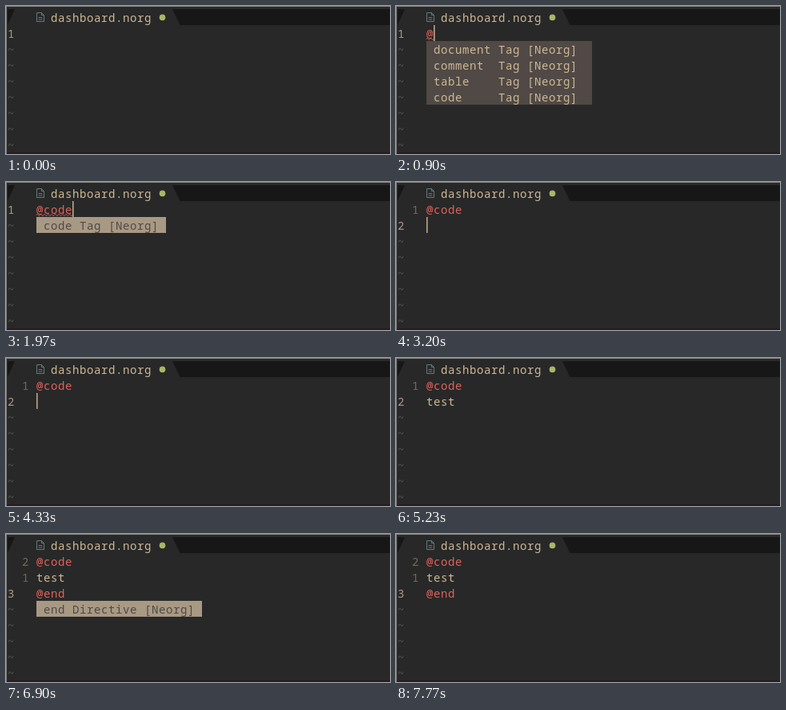
These frames come from a looping animation (480 px wide and 186 px high, 8000 ms). An HTML page:

```html
<!DOCTYPE html>
<html lang="en">
<head>
<meta charset="utf-8">
<title>Editor completion</title>
<style>
  html, body { margin: 0; width: 100%; height: 100%; overflow: hidden; background: #282828; }
  svg { display: block; width: 480px; height: 186px; }
  text {
    font-family: "Source Code Pro", "Noto Sans Mono", "DejaVu Sans Mono", monospace;
    font-size: 14px;
    letter-spacing: .6px;
    fill: #ceb995;
    white-space: pre;
  }
  .tag { fill: #de635b; }
  .now { fill: #a89984; }
  .rel { fill: #74695e; }
  .tilde { fill: #5a524c; }
  .menu rect { fill: #504945; }
  .menu.sel rect { fill: #a89984; }
  .menu.sel text { fill: #504945; }
</style>
</head>
<body>
<svg viewBox="0 0 480 186">
  <rect width="480" height="186" fill="#282828"/>
  <path d="M2 4H11L2 24ZM208 4H480V24H217.5Z" fill="#171717"/>
  <path d="M0 .5H480M.5 0V186" stroke="#80807d"/>
  <rect x="1" y="184" width="479" height="2" fill="#261c1f"/>
  <path d="M38.5 8.5H44.5L47.5 11.5V19.5H38.5ZM44.5 8.5V11.5H47.5M40.5 14.5H45.5M40.5 17H45.5"
    fill="none" stroke="#627a7d"/>
  <text x="56" y="19.5">dashboard.norg</text>
  <circle cx="195.5" cy="14.4" r="3.8" fill="#a9b665"/>
  <g id="view"></g>
</svg>
<script>
const LOOP = 8000, CELL = 9, ROW = 20, LEFT = 38, TOP = 24, ROWS = 8;
const view = document.getElementById("view");

const menus = {
  all: { width: 23, rows: ["document Tag [Neorg]", "comment  Tag [Neorg]", "table    Tag [Neorg]", "code     Tag [Neorg]"] },
  co: { width: 21, rows: ["comment Tag [Neorg]", "code    Tag [Neorg]"] },
  code: { width: 18, rows: ["code Tag [Neorg]"] },
  end: { width: 23, rows: ["end Directive [Neorg]"] }
};

// Each step changes part of the editor state.
const steps = [
  [0, { text: "", cursor: false, menu: "", sel: false, wave: false }],
  [200, { cursor: true }],
  [270, { text: "@", wave: true }],
  [570, { menu: "all" }],
  [1200, { text: "@c" }],
  [1230, { menu: "co" }],
  [1300, { text: "@co" }],
  [1430, { text: "@cod", menu: "code" }],
  [1600, { text: "@code" }],
  [2630, { cursor: false }],
  [2800, { cursor: true, menu: "" }],
  [2970, { wave: false }],
  [3200, { text: "@code\n" }],
  [3800, { cursor: false }],
  [4300, { cursor: true }],
  [4370, { text: "@code\nt" }],
  [4450, { text: "@code\nte" }],
  [4530, { text: "@code\ntes" }],
  [4600, { text: "@code\ntest" }],
  [5230, { cursor: false }],
  [5370, { text: "@code\ntest\n", cursor: true }],
  [5600, { text: "@code\ntest\n@" }],
  [5630, { text: "@code\ntest\n@e", menu: "end" }],
  [6270, { text: "@code\ntest\n@en" }],
  [6360, { text: "@code\ntest\n@end" }],
  [6530, { sel: true }],
  [6830, { cursor: false }],
  [7230, { cursor: true, menu: "", sel: false }],
  [7770, { cursor: false }]
];

function stateAt(t) {
  const state = {};
  for (const [start, change] of steps) if (t >= start) Object.assign(state, change);
  // The held key flips the selection until it rests on the entry.
  if (t >= 1770 && t < 2800) state.sel = Math.floor((Math.min(t, 2570) - 1770) / 50) % 2 === 0;
  return state;
}

const label = (x, row, text, kind = "") =>
  `<text x="${x}" y="${TOP + row * ROW + 15.5}" class="${kind}">${text}</text>`;

function wave(cells) {
  let d = `M${LEFT} 41.5`;
  for (let i = 0; i < cells * 2; i++) d += "q1.125 -2.4 2.25 0t2.25 0";
  return `<path d="${d}" fill="none" stroke="#de635b"/>`;
}

function menu(name, row, sel) {
  const { width, rows } = menus[name];
  const box = `<rect x="${LEFT}" y="${TOP + row * ROW}" width="${width * CELL}" height="${rows.length * ROW}"/>`;
  return `<g class="menu${sel ? " sel" : ""}">${box}` +
    rows.map((text, i) => label(LEFT + CELL, row + i, text)).join("") + "</g>";
}

function render(state) {
  const lines = state.text.split("\n"), last = lines.length - 1;
  let out = "";
  for (let i = 0; i < ROWS; i++) {
    if (i > last) { out += label(2, i, "~", "tilde"); continue; }
    out += i === last ? label(2, i, i + 1, "now") : label(20, i, last - i, "rel");
    out += label(LEFT, i, lines[i], lines[i][0] === "@" ? "tag" : "");
  }
  if (state.wave) out += wave(lines[0].length);
  if (state.menu) out += menu(state.menu, last + 1, state.sel);
  if (state.cursor) {
    const x = LEFT + lines[last].length * CELL;
    out += `<rect x="${x}" y="${TOP + last * ROW}" width="1.6" height="${ROW}" fill="#b9a78a"/>`;
  }
  return out;
}

const began = performance.now();
let shown = "";
function tick() {
  const next = render(stateAt((performance.now() - began) % LOOP));
  if (next !== shown) view.innerHTML = shown = next;
  requestAnimationFrame(tick);
}
tick();
</script>
</body>
</html>
```
